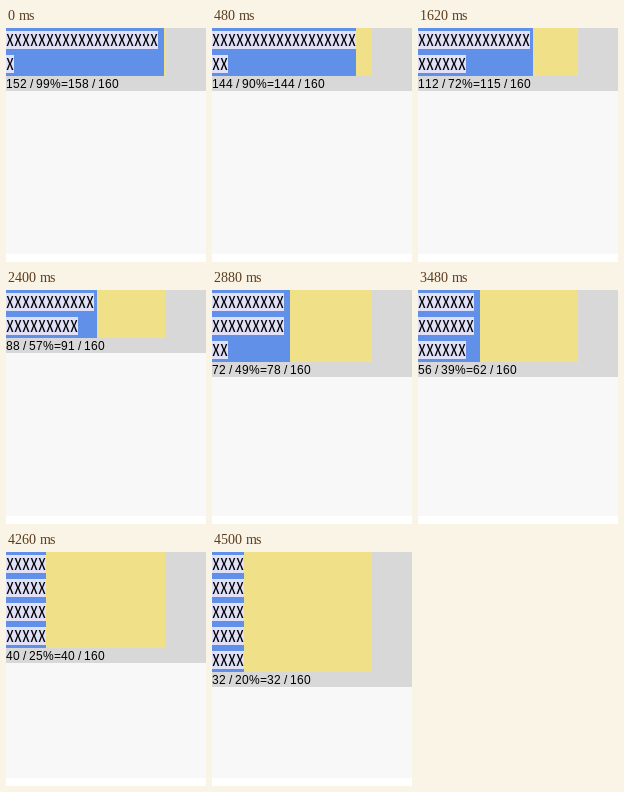
Animation of 200x234 px, one loop 4560 ms. Source, as an HTML page with a canvas:

```html
<!DOCTYPE html>
<html lang="en">
<head>
<meta charset="utf-8">
<title>Shrinking text box</title>
<style>
  html, body { margin: 0; width: 100%; height: 100%; overflow: hidden; background: #fff; }
  canvas { display: block; }
</style>
</head>
<body>
<canvas id="stage" width="200" height="234"></canvas>
<script>
const ctx = document.getElementById('stage').getContext('2d');
const STEP = 60, STEPS = 76;
const FULL = 160, CELL = 8, LINE = 24, CHARS = 20;
const MONO = '16px "Noto Sans Mono CJK JP", "Noto Sans Mono CJK SC", "Noto Sans Mono", monospace';
const SANS = '12px "Liberation Sans", Arial, sans-serif';

// [step, percent]: the pace of the shrinking varies slightly.
const pace = [[0, 99], [9, 89], [16, 83], [18, 81], [27, 72], [36, 62], [40, 57], [58, 39], [71, 25], [75, 20]];

function percentAt(step) {
  const i = Math.max(1, pace.findIndex(([s]) => s >= step));
  const [s0, p0] = pace[i - 1], [s1, p1] = pace[i];
  return Math.round(p0 + (p1 - p0) * (step - s0) / (s1 - s0));
}

function rect(color, x, y, w, h) {
  ctx.fillStyle = color;
  ctx.fillRect(x, y, w, h);
}

// Every character advances by a whole number of pixels.
function write(text, font, x, y) {
  ctx.font = font;
  ctx.fillStyle = '#000';
  for (const char of text) {
    ctx.fillText(char, x, y);
    x += Math.round(ctx.measureText(char).width);
  }
}

function draw(percent) {
  const width = Math.round(FULL * percent / 100);
  const perRow = Math.floor(width / CELL);
  const rows = Math.ceil(CHARS / perRow);
  const height = rows * LINE;

  rect('#fff', 0, 0, 200, 234);
  rect('#f8f8f8', 0, 0, 200, 226);
  rect('#d8d8d8', 0, 0, 200, height + 15);
  rect('#f0e088', 0, 0, FULL, height);
  rect('#6090e8', 0, 0, width, height);

  for (let row = 0; row < rows; row++) {
    const count = Math.min(perRow, CHARS - row * perRow);
    const top = row * LINE;
    rect('#e0e0f8', 0, top + 3, count * CELL, 18);
    write('X'.repeat(count), MONO, 0, top + 18);
  }
  write(`${perRow * CELL} / ${percent}%=${width} / ${FULL}`, SANS, 0, height + 12);
}

function tick() {
  draw(percentAt(Math.floor(performance.now() / STEP) % STEPS));
  requestAnimationFrame(tick);
}
tick();
</script>
</body>
</html>
```
